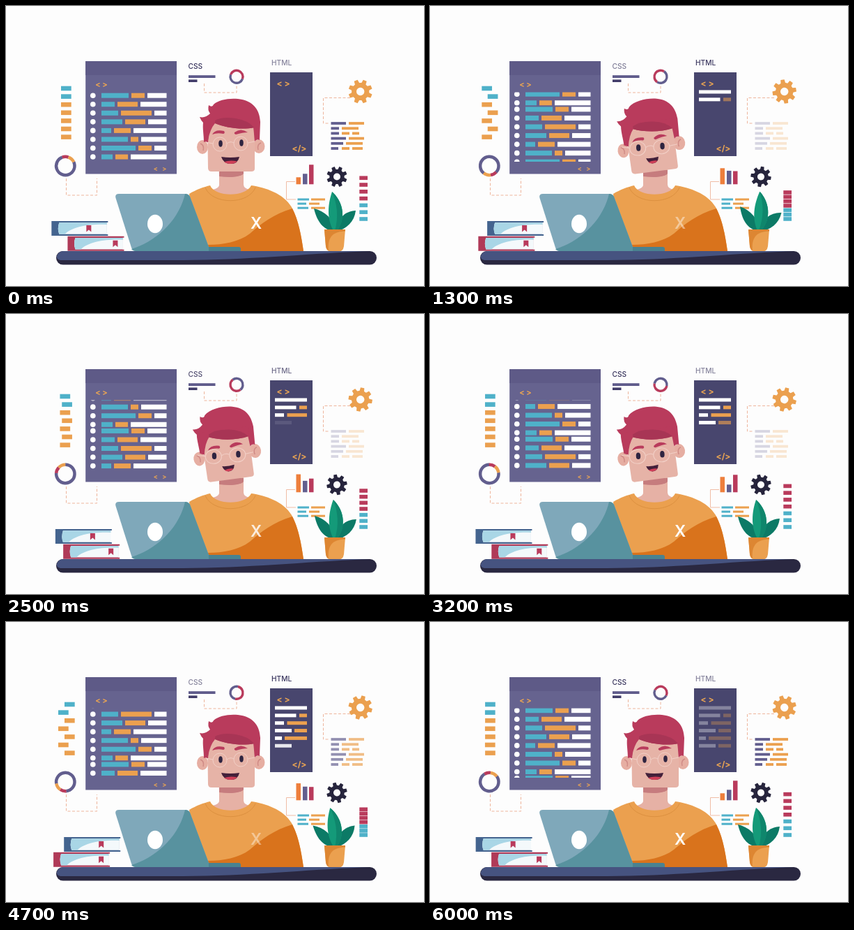
Write an HTML page that moves like this. It is 600 px wide and 401 px high and loops after 6.1 s.

```html
<!DOCTYPE html>
<html lang="en">
<head>
<meta charset="utf-8">
<title>Developer at a desk</title>
<style>
  html, body { margin: 0; width: 100%; height: 100%; overflow: hidden; background: #fdfdfd; }
  svg { display: block; width: 600px; height: 401px; }
  text { font-family: Inter, sans-serif; }
  .tag { font-weight: 700; fill: #eba552; }
  .label { font-weight: 500; font-size: 10.2px; fill: #37335c; }
  .dash { fill: none; stroke: #eeb59c; stroke-width: 1; stroke-dasharray: 4 2.5; }
</style>
</head>
<body>
<svg viewBox="0 0 600 401" xmlns="http://www.w3.org/2000/svg">
  <defs>
    <clipPath id="listClip"><rect x="114" y="123.5" width="131" height="99.5"/></clipPath>
    <g id="book">
      <path d="M0 0H81V2H79V19H81V21H0Z"/>
      <path d="M11 2.2H79.5V18.8H11Q8 10.5 11 2.2Z" fill="#f4f9fb"/>
      <path d="M11 2.2H79.5V5C54 4 30 8 19 18.8H11Q8 10.5 11 2.2Z" fill="#a9d6e6"/>
    </g>
  </defs>
  <rect width="600" height="401" fill="#fdfdfd"/>

  <!-- code list panel -->
  <rect x="114.200" y="79" width="130.800" height="161.500" fill="#66638f"/>
  <rect x="114.200" y="79" width="130.800" height="20" fill="#5e5a87"/>
  <text class="tag" x="137" y="116" font-size="11" text-anchor="middle">&lt; &gt;</text>
  <text class="tag" x="221" y="236.300" font-size="9" text-anchor="middle">&lt;&#160;&#160;&#160;&gt;</text>
  <g clip-path="url(#listClip)"><g id="list"></g></g>

  <g id="leftBars"></g>
  <path class="dash" d="M86.500 247V271H130.500V247"/>
  <g id="ringA" fill="none" stroke-width="4.500"></g>

  <text class="label" id="css" x="261.500" y="90">CSS</text>
  <rect x="262" y="99.200" width="38.500" height="3.800" fill="#5f5b8b"/>
  <rect x="262" y="105.400" width="12.500" height="3.600" fill="#413c69"/>
  <path class="dash" d="M284.500 111V124H331V112"/>
  <g id="ringB" fill="none" stroke-width="3.400"></g>

  <!-- markup panel -->
  <text class="label" id="html" x="381" y="85">HTML</text>
  <rect x="379" y="95" width="61" height="120" fill="#48466e"/>
  <text class="tag" x="398" y="114.500" font-size="12" text-anchor="middle">&lt; &gt;</text>
  <text class="tag" x="421" y="207.500" font-size="12" text-anchor="middle">&lt;/&gt;</text>
  <g id="typed"></g>

  <path class="dash" d="M494 131.500H455.500V168H463"/>
  <path id="gearA" fill="#eba04f" fill-rule="evenodd"/>
  <g id="notes"></g>
  <path d="M415 251.500H402.500V277H416" fill="none" stroke="#f0bda6"/>
  <g id="chart"></g>
  <g id="lines"></g>
  <path id="gearB" fill="#26243c" fill-rule="evenodd"/>
  <g id="rightBars"></g>

  <!-- person -->
  <path d="M306 225H341V256Q341 262 354 264L350 275H296L291 264Q306 262 306 256Z" fill="#e6b1a5"/>
  <path d="M306 235H341V240C337 245 322 246 306 244Z" fill="#c67c7e"/>
  <path d="M263 269C273 263 284 259 293 257C300 274 344 274 352 257C372 260 398 268 410 288C420 306 424 330 427 351H270Z" fill="#eba04f"/>
  <path d="M411 290C420 307 424 330 427 351H282L290 342C312 342 334 338 350 326C366 312 384 298 411 290Z" fill="#d9731c"/>
  <path d="M286 260C296 285 348 285 358 260" fill="none" stroke="#dc9040" stroke-width="1"/>
  <text id="letter" x="359" y="319" font-size="22.500" font-weight="600" fill="#fff" text-anchor="middle">X</text>

  <g id="head">
    <g fill="#e6aea2">
      <ellipse cx="282" cy="202" rx="8" ry="10"/>
      <ellipse cx="363" cy="201" rx="8.500" ry="10"/>
    </g>
    <path d="M279 197Q285 199 283 207M366 196Q360 198 362 206" fill="none" stroke="#cf8a85" stroke-width="1.500"/>
    <path d="M289 160H357V233Q357 237 352 237H295Q290 237 290 232Z" fill="#e6b3a7"/>
    <path d="M284 195C284 184 282 176 283 167Q280 164 278 159Q286 161 293 154Q289 149 291 142Q296 146 298 141C306 133 326 131 339 134C356 138 364 149 365 166L364 192Q360 190 357 194C356 185 356 178 354 168H294C291 176 291 186 290 196Q287 193 284 195Z" fill="#b93b5c"/>
    <g id="fringe">
      <path d="M286 160H357V174C338 178 314 174 300 168Q293 176 290 192L285 190Z" fill="#b93b5c"/>
      <path d="M300 164Q310 158 330 161Q348 164 356 174C338 178 314 174 300 168Z" fill="#a83555"/>
    </g>
    <path id="brows" d="M296 184Q300 176 313 179Q315 182 312 183Q303 181 296 184ZM328 181Q337 174 347 181Q340 181 330 184Q327 183 328 181Z" fill="#b93b5c"/>
    <g id="face">
      <g fill="#2e2440">
        <ellipse cx="308" cy="197" rx="2.800" ry="4.800"/>
        <ellipse cx="338" cy="196" rx="2.800" ry="4.800"/>
      </g>
      <g fill="none" stroke="#f2cfc6" stroke-width="1">
        <circle cx="307" cy="198" r="10"/>
        <circle cx="337" cy="197" r="10"/>
        <path d="M317 197Q322 193 327 196M297 197L287 195M347 196L357 194"/>
      </g>
    </g>
    <g id="mouth">
      <path d="M-13 -5Q0 -3 13 -5Q11 5 1 5Q-10 5 -13 -5Z" fill="#43203a"/>
      <path d="M-9 2.200Q0 -1 10 1.500Q6 5 1 5Q-5 5 -9 2.200Z" fill="#cf3f58"/>
    </g>
  </g>

  <!-- laptop -->
  <path d="M284 345H334Q337 345 337 348V351H190Z" fill="#4a8290"/>
  <path d="M162 269H257Q262 269 264 273L291 345V351H187Q182 351 180 346L157.500 275Q156 269 162 269Z" fill="#7fa8ba"/>
  <path d="M257 269Q262 269 264 273L291 345V351H187Q182 351 180 348C214 338 248 308 257 269Z" fill="#58929f"/>
  <ellipse cx="214" cy="312" rx="11" ry="13.200" fill="#fff"/>

  <!-- plant -->
  <g id="plant">
    <path d="M473 322C476 304 486 294 502 293C500 309 489 319 474 323Z" fill="#0c7a66"/>
    <path d="M472 322C455 322 446 307 442 290C458 294 469 304 474 322Z" fill="#0c7a66"/>
    <path d="M470 322C460 304 462 284 468 266C482 278 490 302 475 322Z" fill="#149a79"/>
    <path d="M468 266C482 278 490 302 475 322H472C478 302 475 282 468 266Z" fill="#0f866c"/>
  </g>
  <path d="M457 320H487L485 344Q484 352 476 352H468Q460 352 459 344Z" fill="#eba04f"/>
  <path d="M457 320H487V322.500C472 323 461 328 463 350.500Q459.500 348 459 344Z" fill="#dd8632"/>

  <!-- desk and books -->
  <rect x="72" y="351" width="460" height="19.500" rx="9.700" fill="#2a2841"/>
  <path d="M82 351H522C440 354 345 364 250 364H78Q72 363 73 358Q76 351 82 351Z" fill="#465380"/>
  <g id="bookA">
    <use href="#book" fill="#44648f"/>
    <path d="M50 6H57V15.500L53.500 12.500L50 15.500Z" fill="#b93b5c"/>
  </g>
  <g id="bookB">
    <use href="#book" fill="#b03a58"/>
    <path d="M65 6H72V15.500L68.500 12.500L65 15.500Z" fill="#b93b5c"/>
  </g>
</svg>
<script>
const LOOP = 6100, HALF = LOOP / 2, QUARTER = LOOP / 4, STEP = 100;
const TEAL = '#4fb1c9', ORANGE = '#eba04f', VIVID = '#ee7f3c', RED = '#b93b5c', PURPLE = '#625e8e', WHITE = '#fff';
const $ = id => document.getElementById(id);

function add(parent, tag, attrs) {
  const node = document.createElementNS('http://www.w3.org/2000/svg', tag);
  set(node, attrs);
  parent.appendChild(node);
  return node;
}
function set(node, attrs) {
  for (const k in attrs) node.setAttribute(k, attrs[k]);
}
const bar = (parent, x1, x2, cy, h, fill) =>
  add(parent, 'rect', { x: x1, y: cy - h / 2, width: x2 - x1, height: h, fill });
const place = (id, transform) => $(id).setAttribute('transform', transform);
const move = (id, x, y) => place(id, `translate(${x} ${y})`);
const spin = (id, x, y, deg) => place(id, `translate(${x} ${y}) rotate(${deg})`);
const fade = (id, opacity) => $(id).setAttribute('opacity', opacity);

const clamp = p => Math.max(0, Math.min(1, p));
const ramp = (t, a, b) => clamp((t - a) / (b - a));
const ease = p => p < .5 ? 2 * p * p : 1 - 2 * (1 - p) * (1 - p);
const mix = (a, b, p) => a + (b - a) * p;

// 0 -> 1 -> 0 twice per loop
function pulse(t) {
  const q = (t - 50 + LOOP) % HALF / QUARTER;
  return ease(q < 1 ? q : 2 - q);
}
// one swing each way per loop, from -1 to 1
const swing = t => pulse(t) * ((t - 50 + LOOP) % LOOP < HALF ? -1 : 1);

function track(times, values, t) {
  let i = 0;
  while (i < times.length - 2 && t > times[i + 1]) i++;
  return mix(values[i], values[i + 1], ramp(t, times[i], times[i + 1]));
}

// scrolling code: end of the teal part, start and end of the orange part
const ROWS = [[176, 180, 199], [156, 160, 189], [161, 165, 209], [167, 171, 200],
              [151, 155, 179], [175, 179, 190], [186, 190, 209], [153, 157, 175]];
const PERIOD = 97, TOP = 128.2;
for (const top of [TOP, TOP - PERIOD]) {
  ROWS.forEach(([a, b, c], i) => {
    const y = top + i * 12.55;
    add($('list'), 'circle', { cx: 124.8, cy: y, r: 3.8, fill: WHITE });
    bar($('list'), 137, a, y, 7, TEAL);
    bar($('list'), b, c, y, 7, ORANGE);
    bar($('list'), c + 4, 230.5, y, 7, WHITE);
  });
}

const leftBars = Array.from({ length: 7 }, (_, i) =>
  bar($('leftBars'), 79, 93.7, 118 + i * 11.6, 6.6, i < 2 ? TEAL : ORANGE));
const rightBars = Array.from({ length: 7 }, (_, i) =>
  bar($('rightBars'), 507.3, 519, 0, 5.6, i < 4 ? RED : TEAL));

// arc on a circle, degrees clockwise from the top
function arc(parent, r, from, to, stroke) {
  const pt = d => `${r * Math.sin(d * Math.PI / 180)} ${-r * Math.cos(d * Math.PI / 180)}`;
  add(parent, 'path', { d: `M${pt(from)}A${r} ${r} 0 ${to - from > 180 ? 1 : 0} 1 ${pt(to)}`, stroke });
}
arc($('ringA'), 13.2, 64, 341, PURPLE);
arc($('ringA'), 13.2, -20, 19, RED);
arc($('ringA'), 13.2, 19, 65, ORANGE);
arc($('ringB'), 9, 110, 290, PURPLE);
arc($('ringB'), 9, -70, 110, RED);

// typed code, in order of appearance: x1, x2, row, colour
const typed = [
  [386, 432, 0, WHITE], [386, 416.5, 1, WHITE], [421, 432, 1, ORANGE], [403.5, 432, 2, ORANGE],
  [386, 399, 2, WHITE], [386, 410, 3, WHITE], [414, 432, 3, ORANGE], [400, 432, 4, ORANGE],
  [386, 396, 4, WHITE], [386, 410, 5, WHITE], [414, 432, 5, ORANGE]
].map(([a, b, row, c]) => bar($('typed'), a, b, 123 + row * 10.85, 5, c));

// first part in one colour, the rest in orange
function textRows(parent, rows, y, gap, h, first) {
  rows.forEach((xs, i) => {
    for (let j = 0; j < xs.length; j += 2)
      bar(parent, xs[j], xs[j + 1], y + i * gap, h, j ? ORANGE : first);
  });
}
textRows($('notes'), [[466.5, 488, 492, 514], [466.5, 478, 482, 506], [466.5, 478, 482, 493, 497, 507],
  [466.5, 488, 492, 514], [466.5, 484, 488, 512], [466.5, 477, 482, 493, 497, 512]], 168, 7.2, 3.8, PURPLE);
textRows($('lines'), [[418.5, 435, 438, 458], [418.5, 431, 435, 450], [418.5, 434, 438, 458]], 277, 6.1, 3, TEAL);

const TIMES = [0, 800, 1900, 3200, 4100, 5200, 6000, LOOP];
const chart = [
  [416.5, VIVID, [10, 18, 29, 22, 27, 22, 10, 10]],
  [426, PURPLE, [15, 18, 21, 11, 19, 20, 15, 15]],
  [435, RED, [28, 22, 15, 25, 18, 20, 28, 28]]
].map(([x, c, heights]) => ({ heights, node: bar($('chart'), x, x + 6.5, 255, 1, c) }));

function gear(node, r, root, hole) {
  const pts = [];
  for (let i = 0; i < 8; i++) {
    for (const [off, rad] of [[-15, root], [-9, r], [9, r], [15, root]]) {
      const a = (i * 45 + 22.5 + off) * Math.PI / 180;
      pts.push(`${(rad * Math.cos(a)).toFixed(2)} ${(rad * Math.sin(a)).toFixed(2)}`);
    }
  }
  node.setAttribute('d', `M${pts.join('L')}ZM${hole} 0A${hole} ${hole} 0 1 0 ${-hole} 0A${hole} ${hole} 0 1 0 ${hole} 0Z`);
}
gear($('gearA'), 17.3, 12.7, 5.7);
gear($('gearB'), 14.8, 10.7, 5);

function draw(t) {
  const p = t / LOOP, beat = pulse(t), sway = swing(t);

  move('list', 0, PERIOD * p - Math.sin(p * 2 * Math.PI));
  leftBars.forEach((n, i) => n.setAttribute('x', 79 + sway * (i % 2 ? -4 : 5)));
  rightBars.forEach((n, i) => n.setAttribute('y', 302.2 - (6 - i) * mix(9.8, 6.1, beat)));

  spin('ringA', 85.3, 229, 720 * p);
  spin('ringB', 331, 101.3, -360 * p);
  spin('gearA', 508.7, 122.5, -360 * p);
  spin('gearB', 475, 244.5, 360 * p);

  fade('css', mix(1, .6, beat));
  fade('html', mix(.6, 1, beat));
  fade('letter', mix(1, .4, beat));

  const out = 1 - ramp(t, 5700, 6150);
  typed.forEach((n, i) => {
    const mid = 350 + i * 465;
    n.setAttribute('opacity', ramp(t, mid - 220, mid + 220) * out);
  });
  fade('notes', track([0, 750, 3200, 5800, LOOP], [1, .24, .24, 1, 1], t));

  for (const { node, heights } of chart) {
    const h = track(TIMES, heights, t);
    set(node, { y: 255.3 - h, height: h });
  }

  // the head leans while the features slide down and spread a little
  const tilt = ease(ramp(t, 600, 1400)) * (1 - ease(ramp(t, 3600, 4550)));
  place('head', `rotate(${-7.5 * tilt} 322 240)`);
  move('fringe', 0, 5 * tilt);
  move('brows', 0, 8 * tilt);
  place('face', `translate(${322 - 2 * tilt} ${197 + 5 * tilt}) rotate(${5 * tilt}) scale(${1 + .15 * tilt} 1) translate(-322 -197)`);
  place('mouth', `translate(322 221) scale(${1 - .32 * tilt} ${1 - .15 * tilt})`);

  place('plant', `rotate(${-sway * (sway < 0 ? 6 : 3)} 472 320)`);
  move('bookA', 65.3 + 18 * beat, 308);
  move('bookB', 88.5 - 20.5 * beat, 329.7);
}

function tick(now) {
  draw(Math.floor(now % LOOP / STEP) * STEP);
  requestAnimationFrame(tick);
}
draw(0);
requestAnimationFrame(tick);
</script>
</body>
</html>
```
